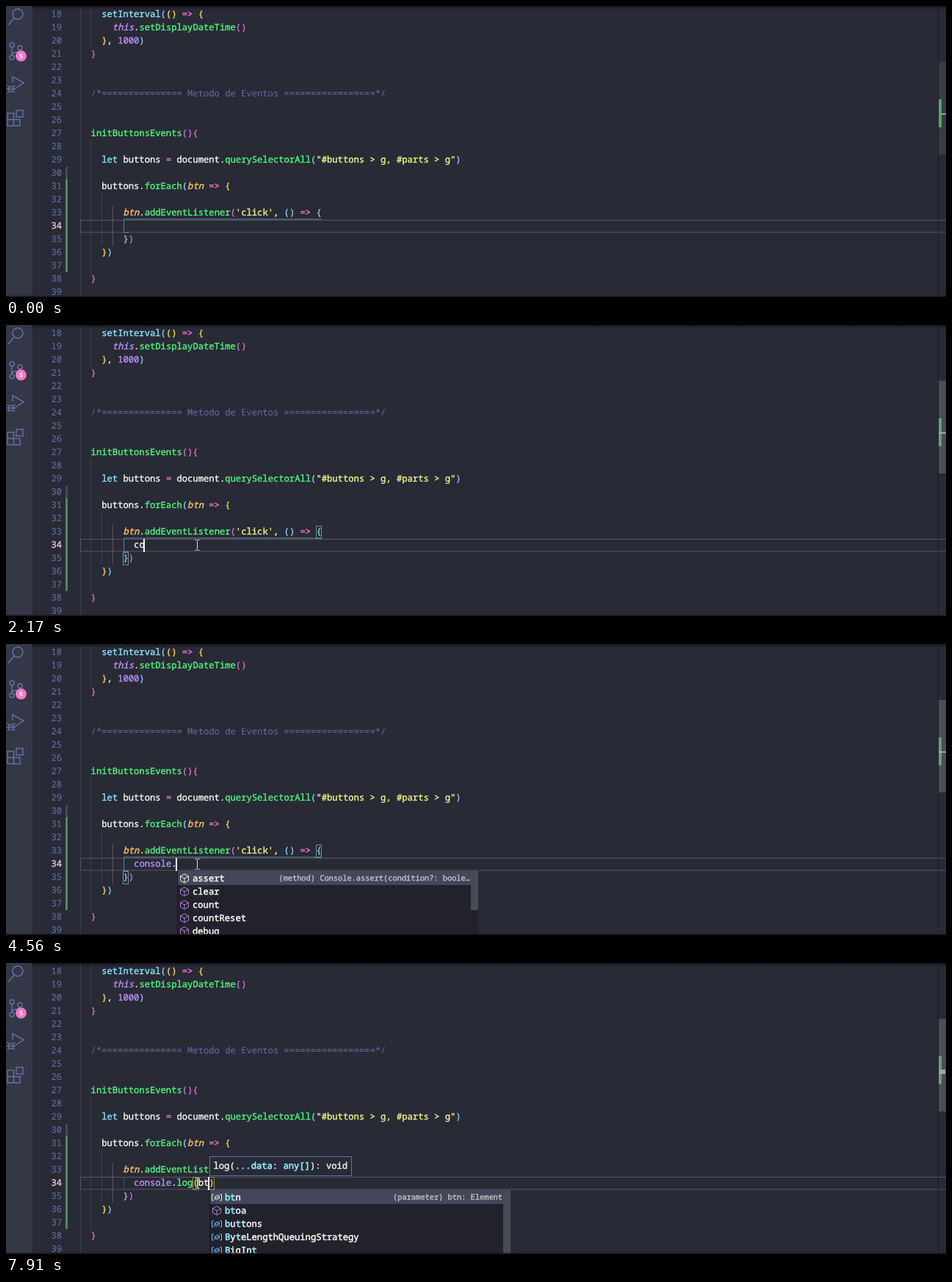
These frames come from a looping animation (1280 px wide and 396 px high, 8 s). An HTML page:

```html
<!DOCTYPE html>
<html lang="en">
<head>
<meta charset="utf-8">
<title>Code editor</title>
<style>
  html, body { margin: 0; width: 100%; height: 100%; overflow: hidden; background: #282a36; }
  svg { display: block; width: 100vw; height: 100vh; }
  text {
    font: 400 12.18px "Noto Sans Mono", "DejaVu Sans Mono", monospace;
    white-space: pre; text-rendering: geometricPrecision;
    color: #f8f8f2; fill: currentColor; stroke: currentColor; stroke-width: .35;
  }
  .w { color: #f8f8f2 } .c { color: #8be9fd } .g { color: #50fa7b } .k { color: #ff79c6 }
  .p { color: #bd93f9 } .s { color: #f4fb88 } .i { color: #bd93f9; font-style: italic }
  .o { color: #ffc861; font-style: italic }
  .y { color: #ffd84a } .r { color: #da70d6 } .b { color: #87cefa }
  .m { color: #6468a0; stroke-width: .1 } .n { color: #6272a4; stroke-width: .1 }
  .active { color: #f3c3ea }
  .label { stroke-width: .5 }
  .hit { color: #8be9fd; stroke-width: .65 }
  .detail { font-size: 10.35px; color: #c4c5ca; text-anchor: end }
  .icon { fill: none; stroke: #6272a4; stroke-width: 1.5 }
  .badge { font: 700 8px "Open Sans", sans-serif; text-anchor: middle; color: #fff; stroke: none }
</style>
</head>
<body>
<svg viewBox="0 0 1280 396" preserveAspectRatio="none">
  <defs>
    <linearGradient id="shade" x2="0" y2="1">
      <stop stop-color="#15161f"/><stop offset="1" stop-color="#15161f" stop-opacity="0"/>
    </linearGradient>
    <pattern id="hatch" width="3" height="3" patternUnits="userSpaceOnUse">
      <path d="M0 3L3 0" stroke="#6d94ad"/>
    </pattern>
  </defs>
  <rect width="1280" height="396" fill="#282a36"/>
  <g id="code"></g>
  <g id="live"></g>
  <g id="ruler">
    <path d="M1269.5 0V396" stroke="#1c1d26"/>
    <rect x="1270" y="127" width="4" height="38" fill="#50a067"/>
    <rect id="thumb" x="1270" y="76" width="10" height="126" fill="#a0a0a0"/>
    <rect id="mark" fill="#a3a4a6"/>
  </g>
  <rect x="36" width="1244" height="5" fill="url(#shade)"/>
  <rect width="36" height="396" fill="#343746"/>
  <g class="icon">
    <circle cx="16" cy="11" r="7"/><path d="M11 16.5L3 26"/>
    <circle cx="8" cy="53" r="3"/><circle cx="19" cy="57" r="3"/><circle cx="8" cy="70" r="3"/>
    <path d="M8 56V67M19 60C19 65 8 61 8 67"/>
    <path d="M9 104V96L24 104.5L13 112"/><circle cx="7" cy="113" r="3.6"/>
    <path d="M1.5 108L4 110M12.5 108L10 110M1 113H13M2 118L4.5 116M12 118L9.5 116"/>
    <path d="M2 146H10.5V163H2ZM2 154.5H19V163H10.5M14 142H23V151H14Z"/>
  </g>
  <circle cx="20.5" cy="68" r="7.5" fill="#f07ac6"/>
  <text class="badge" x="20.5" y="71">5</text>
  <rect y="394.5" width="1280" height="1.5" fill="#1d1420"/>
  <path id="mouse" d="M-3 -7H-1L0 -6L1 -7H3M0 -6V6M-3 7H-1L0 6L1 7H3" fill="none" stroke="#dcdcdc"/>
</svg>
<script>
const LOOP = 8000, CHAR = 7.308, LEFT = 101, CARET_LINE = 34;
const $ = id => document.getElementById(id);
const colX = col => LEFT + col * CHAR;
const lineY = n => 11 + (n - 18) * 18;
const escapeText = s => s.replace(/&/g, '&amp;').replace(/</g, '&lt;');

// "§" starts a token; the next letter is its colour class
const tokens = s => s.split('§').slice(1)
  .map(t => `<tspan class="${t[0]}">${escapeText(t.slice(1))}</tspan>`).join('');
const plain = s => s.replace(/§./g, '');
const text = (x, cy, body, cls = '') => `<text class="${cls}" x="${x}" y="${cy + 4}">${body}</text>`;
const rect = (x, y, w, h, fill, more = '') =>
  `<rect x="${x}" y="${y}" width="${w}" height="${h}" fill="${fill}" ${more}/>`;
const stroke = (d, color) => `<path d="${d}" fill="none" stroke="${color}"/>`;
const bracketBox = (col, line, color) =>
  rect(Math.floor(colX(col)) + .5, lineY(line) - 7.5, 7, 17, 'none', `stroke="${color}"`);

const lines = {
  18: [4, '§csetInterval§b(§y()§k => §y{'],
  19: [6, '§ithis§w.§gsetDisplayDateTime§r()'],
  20: [4, '§y}§w, §p1000§b)'],
  21: [2, '§r}'],
  24: [2, `§m/*${'='.repeat(15)} Metodo de Eventos ${'='.repeat(17)}*/`],
  27: [2, '§ginitButtonsEvents§r(){'],
  29: [4, '§clet §wbuttons §k= §wdocument.§gquerySelectorAll§b(§s"#buttons > g, #parts > g"§b)'],
  31: [4, '§wbuttons.§gforEach§b(§obtn§k => §y{'],
  33: [8, "§obtn§w.§gaddEventListener§r(§s'click'§w, §b()§k => §b{"],
  35: [8, '§b}§r)'],
  36: [4, '§y}§b)'],
  38: [2, '§r}']
};

function drawCode() {
  let out = stroke('M101.5 0V396M115.5 2V56M115.5 182V362M130.5 254V326', '#3d3f4d')
    + stroke('M145.5 272V326', '#555866')
    + rect(81, 219, 3, 17, 'url(#hatch)') + rect(81, 236, 3, 126, '#459058')
    + rect(101.5, 291.5, 1190, 16.5, 'none', 'stroke="#555762"');
  for (let n = 18; n < 40; n++) {
    out += text(76 - 2 * CHAR, lineY(n), n, n === CARET_LINE ? 'active' : 'n');
    if (lines[n]) out += text(colX(lines[n][0]), lineY(n), tokens(lines[n][1]));
  }
  $('code').innerHTML = out;
}

// Rows: kind letter, then the label with matched letters between "*"
const popups = {
  con: { rows: ['v*con*sole', 'v*con*st', 'v*con*tinue', 'm*con*firm', 'v*Con*stantSourceNode'], detail: 'var console: Console' },
  conso: {
    rows: ['v*conso*le', 'v*Cons*tantS*o*urceNode', 'v*c*ross*O*rigi*n*I*so*lated',
      'vDynamics*Co*mpre*s*sor*No*de', 'vHTMLForm*Con*trol*s*C*o*llection'],
    detail: 'var console: Console'
  },
  console: { rows: ['v*console*'], detail: 'var console: Console' },
  members: {
    rows: ['massert', 'mclear', 'mcount', 'mcountReset', 'mdebug'],
    detail: '(method) Console.assert(condition?: boole…', scroll: 53
  },
  l: { rows: ['m*l*og', 'mc*l*ear', 'mtab*l*e', 'mtime*L*og', 'mtimeEnd'], detail: '(method) Console.log(...data: any[]): void' },
  lo: { rows: ['m*lo*g', 'mtime*Lo*g'], detail: '(method) Console.log(...data: any[]): void' },
  b: { rows: ['v*b*tn', 'v*b*uttons', 'm*b*lur', 'm*b*toa', 'v*B*igInt'], detail: '(parameter) btn: Element', scroll: 87 },
  bt: {
    rows: ['v*bt*n', 'm*bt*oa', 'v*b*u*t*tons', 'v*B*y*t*eLengthQueuingStrategy', 'v*B*igIn*t*'],
    detail: '(parameter) btn: Element', scroll: 87
  }
};

const iconPaths = {
  v: 'M3 -4H.5V4H3M11 -4H13.5V4H11M4 -.5L8 -3L10.5 -1.5V1L6.5 3.2L4 2ZM4 -.5L6.5 1L10.5 -1.5',
  m: 'M7 -6L12.5 -3V3L7 6L1.5 3V-3ZM1.5 -3L7 0L12.5 -3M7 0V6'
};
const iconColors = { v: '#75beff', m: '#b180d7' };

function drawPopup({ rows, detail, scroll }, x) {
  const height = rows.length * 18 + 1, width = 410;
  let out = rect(x, 309, width, height, '#21222c') + rect(x, 309, width, 19, '#44475a');
  rows.forEach((row, i) => {
    const kind = row[0], cy = 318.5 + i * 18;
    const label = row.slice(1).split('*')
      .map((part, j) => `<tspan class="${j % 2 ? 'hit' : ''}">${part}</tspan>`).join('');
    out += `<g transform="translate(${x + 3} ${cy + .5})">`
      + stroke(iconPaths[kind], i ? iconColors[kind] : '#f0f0f0') + '</g>'
      + text(x + 21, cy, label, 'label');
  });
  out += text(x + width - 11, 317.5, detail, 'detail');
  if (scroll) out += rect(x + width - 10, 309, 10, scroll, '#484a55');
  return out + stroke(`M${x + .5} 309V${309 + height}`, '#191a21');
}

const drawHint = x => rect(x + .5, 263.5, 193, 26, '#282a36', 'stroke="#6272a4"')
  + text(x + 5.5, 276, 'log(<tspan class="hit">...data: any[]</tspan>): void');

const obj = '§pconsole§w.', call = obj + '§glog', open = call + '§y(§w';
// [time, text before caret, caret visible, popup, hint visible]
const steps = [
  [0, '', 0], [280, '', 1], [790, '', 0], [1300, '', 1], [1810, '', 0],
  [1980, '§wc', 1], [2110, '§wco', 1], [2200, '§wcon', 1], [2270, '§wcon', 1, 'con'],
  [2550, '§wcons', 1, 'conso'], [2650, '§wconso', 1, 'conso'],
  [2850, '§wconsol', 1, 'console'], [2970, '§wconsole', 1, 'console'],
  [3110, '§pconsole', 1, 'console'], [3460, '§pconsole', 0, 'console'], [3990, '§pconsole', 1, 'console'],
  [4470, obj, 1], [4560, obj, 1, 'members'],
  [4750, obj + '§wl', 1, 'l'], [4910, obj + '§wlo', 1, 'lo'],
  [5250, obj + '§wlog', 1], [5380, call, 1], [5750, call, 0],
  [6230, open, 1], [6400, open, 1, '', 1], [6760, open, 0, '', 1], [7240, open, 1, '', 1],
  [7540, open + 'b', 1, '', 1], [7720, open + 'b', 1, 'b', 1], [7880, open + 'bt', 1, 'bt', 1]
];

function drawStep([time, typed, caret, popup, hint]) {
  const col = 10 + plain(typed).length, x = Math.ceil(colX(col)), inCall = time >= 6230;
  let out = stroke('M160.5 291V308', '#4b4e5c');
  if (!inCall) out += stroke('M430 290H160.5V308.5H167', '#5f8297');
  if (inCall) out += bracketBox(21, CARET_LINE, '#a48d42') + bracketBox(col, CARET_LINE, '#a48d42');
  else if (time >= 1980) out += bracketBox(44, 33, '#5d9b94') + bracketBox(8, 35, '#5d9b94');
  out += text(colX(10), lineY(CARET_LINE), tokens(typed + (inCall ? '§y)' : '')));
  if (popup) out += drawPopup(popups[popup], x);
  if (hint) out += drawHint(x);
  if (caret) out += rect(x - 2, 291, 2, 18, '#f8f8f0');
  $('live').innerHTML = out;

  const [mx, my, mw, mh] = inCall ? [1271, 145, 8, 6] : time ? [1270, 146, 10, 2] : [1274, 146, 6, 2];
  Object.entries({ x: mx, y: my, width: mw, height: mh }).forEach(([k, v]) => $('mark').setAttribute(k, v));
}

const mousePath = [[200, 46, 18], [560, 511, 348], [940, 260.5, 299.5]];

function moveMouse(t) {
  const now = Math.min(940, 200 + Math.floor((t - 200) / 37) * 37);
  const [from, to] = now < 560 ? mousePath : mousePath.slice(1);
  const u = (now - from[0]) / (to[0] - from[0]), e = u * u * (3 - 2 * u);
  const at = i => from[i] + (to[i] - from[i]) * e;
  $('mouse').style.visibility = t < 200 ? 'hidden' : 'visible';
  $('mouse').setAttribute('transform', `translate(${at(1)} ${at(2)})`);
  $('thumb').setAttribute('fill-opacity', t < 300 ? .14 : .3);
}

let shown;
function frame() {
  const t = performance.now() % LOOP;
  const step = steps.findLast(s => s[0] <= t);
  if (step !== shown) drawStep(shown = step);
  moveMouse(t);
  requestAnimationFrame(frame);
}

drawCode();
frame();
</script>
</body>
</html>
```
